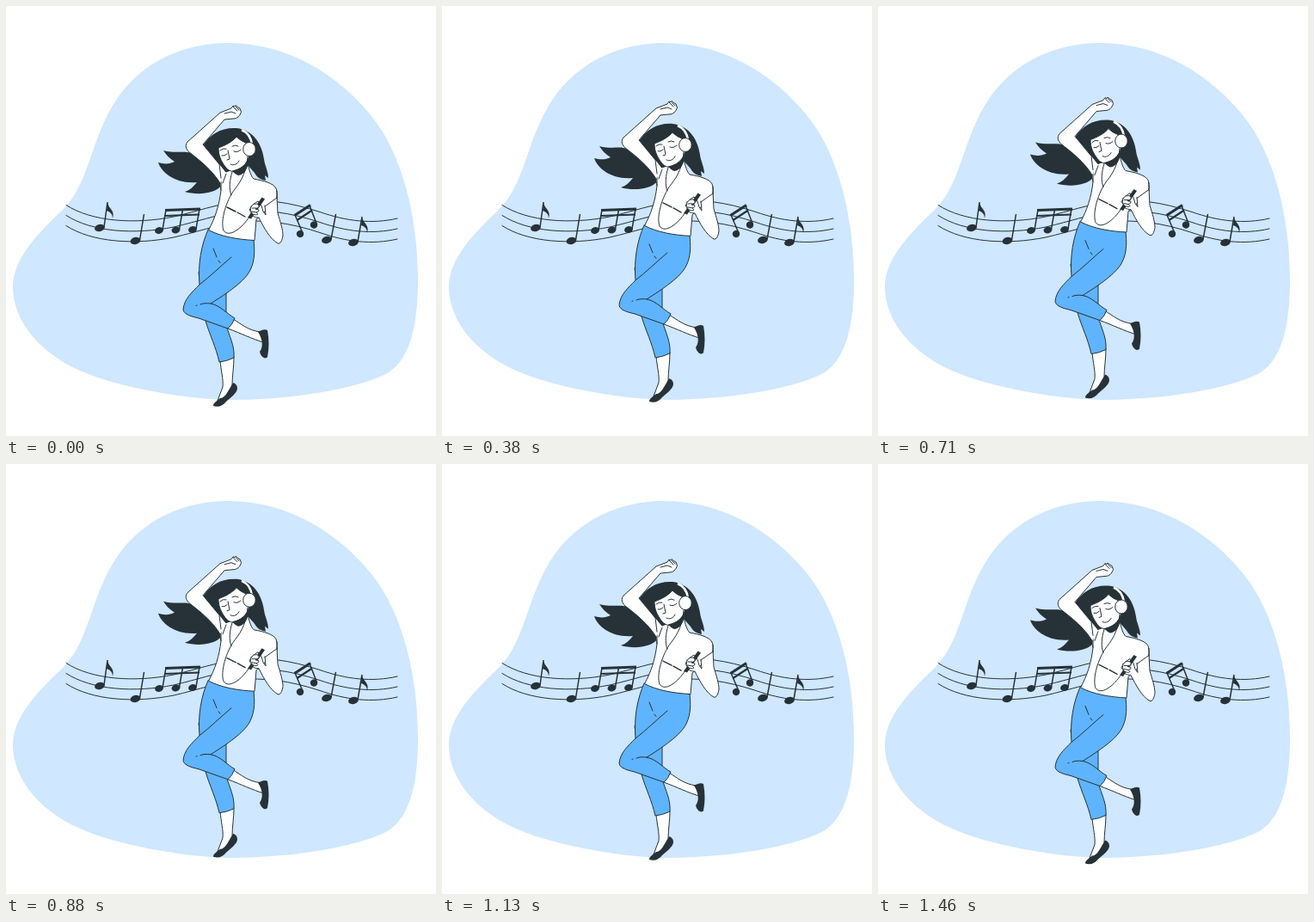
Animation of 500 by 500 pixels, one loop 1.5 s. Source, as an HTML page:

```html
<!DOCTYPE html>
<html lang="en">
<head>
<meta charset="utf-8">
<title>Dancing to music</title>
<style>
  html, body { margin: 0; width: 100%; height: 100%; overflow: hidden; background: #fff; }
  svg { display: block; width: 100vw; height: 100vh; }
  .ink { fill: #263238; }
  .line { fill: none; stroke: #263238; stroke-linecap: round; stroke-linejoin: round; }
  .skin { fill: #fff; stroke: #263238; stroke-linecap: round; stroke-linejoin: round; }
  .blue { fill: #5fb4ff; stroke: #263238; stroke-linecap: round; stroke-linejoin: round; }
</style>
</head>
<body>
<svg viewBox="0 0 500 500">
  <path fill="#cfe7ff" d="M258 43C330 43 388 82 425 128C462 174 479 248 479 318C479 366 472 408 445 426C412 445 330 458 262 458C200 457 128 441 96 428C40 407 8 366 8 327C8 292 40 262 66 237C98 205 98 154 129 108C159 64 208 43 258 43Z"/>
  <g id="staff" class="line"></g>
  <g id="notes"></g>

  <g id="dancer">
    <!-- hair -->
    <path class="ink" d="M268 142C250 141 238 149 229 162L221 172L211 170C204 169 194 171 183 168C186 173 190 177 196 181C190 184 184 184 177 182C181 194 197 207 222 205C218 210 214 214 208 216C222 220 243 219 251 208L262 196L281 185L289 194C292 200 297 202 302 203L301 197L305 200C305 192 301 186 300 178C298 162 288 144 268 142Z"/>

    <!-- standing leg -->
    <path class="skin" d="M249 412C250 425 253 434 252 443L246 459L256 456L263 441C263 430 265 420 265 408Z"/>
    <path class="ink" d="M264 438C267 439 269 441 269 445C268 451 261 455 256 460C252 465 247 467 241 465C241 461 246 459 249 456C255 456 258 448 264 438Z"/>
    <path class="blue" d="M224 310L232 366C237 383 244 396 248 414Q257 413 265 409C266 395 260 385 256 371L256 325Z"/>

    <!-- hips and raised leg -->
    <path class="skin" d="M264 364C274 370 281 377 296 379L299 391C286 387 274 381 258 375Z"/>
    <path class="ink" d="M293 379C296 377 301 375 304 377C306 388 306 398 304 408C302 411 298 409 296 405L295 402C299 397 299 388 293 379Z"/>
    <path class="blue" d="M235 260C227 278 223 300 225 324C216 333 207 341 206 353C207 359 216 361 224 363L258 375Q263 371 266 363C257 358 249 348 238 346C257 334 278 320 284 307C290 295 289 283 288 271Z"/>
    <path class="line" d="M225 324C238 314 250 302 262 292M238 346Q230 345 226 347M222 348L221 348.4M241 282L245 292M247 296L249 298.5"/>

    <!-- torso -->
    <path class="skin" d="M253 194L264 190L281 183C283 192 285 198 288 201C299 203 311 206 314 212C316 218 315 225 315 226L291 248L289 272.500C269 271.500 250 268 235.500 260.500C243 247 248 232 250 214C248 207 249 200 253 194Z"/>
    <path class="line" d="M250 214L250 200M256 195L252 206"/>

    <!-- raised arm -->
    <path class="skin" style="stroke:none" d="M249 124L211 158C208 162 209 166 213 170C226 180 240 191 249 206L256 194L248 184L229 161L254 132L264 131C269 130 272 127 273 123L268 116L264 116L262 119Z"/>
    <path class="line" d="M249 206C240 191 226 180 213 170C209 166 208 162 211 158L249 124L262 119L264 116L266 117L267 115.500L270 118L272 119L273.500 123C272 128 269 131 264 131L254 132L229 161L248 184L250 200M254 125L262 123L267 125M264 117L269 122M267 117L271 121"/>

    <!-- face -->
    <path class="skin" d="M247 165C255 162 263 158 268 152C272 156 276 158 279 159L283 172C282 181 276 188 266 192C262 193 258 191 255 187C250 180 247 174 247 165Z"/>
    <path class="ink" d="M263 191.500C270 190 276 187 281 181L281 186C279 193 274 197 270 197C267 196 265 194 263 191.500Z"/>
    <path class="line" d="M249 168Q252 165 256 166M263 163Q267 161 270 163M251 174Q254 175 257 172M265 169Q269 171 273 167M258 168L260 178L257 179M261 184C265 186 269 184 271 180"/>

    <!-- headphones -->
    <path d="M274 144C281 147 285 153 286 161" fill="none" stroke="#fff" stroke-width="2.600"/>
    <ellipse class="skin" cx="283" cy="166.500" rx="7.300" ry="8"/>

    <!-- cord -->
    <path class="line" d="M281 175C280 190 275 202 266 213C256 226 249 250 253 261C259 270 274 259 283 245M263 193C260 202 259 213 262 220"/>
    <path class="line" style="stroke-width:1.400" d="M257 234L267 239M269 240L278 245"/>

    <!-- lowered arm -->
    <path class="skin" d="M315 222L316 241C319 251 322 260 322 267C321 273 319 277 316 276C307 271 300 258 294 246C289 246 285 244 285 240L283 237L287 231L293 227L297 232L299 239L302 243L301 232"/>
    <path class="line" d="M315 215L315 223L301 233"/>
    <path class="ink" d="M297.500 222.500L301 224.500L285 247.500L281 246Z"/>
    <path class="skin" style="stroke-width:.9" d="M285 233Q288 229 292 230Q295 232 294 234L290 236L294 237Q295 239 291 240L293 242Q292 244 287 242Q283 238 285 233Z"/>
    <path class="line" d="M286 235L291 235M286 239L291 240"/>
  </g>
</svg>
<script>
const $ = id => document.getElementById(id);
const LOOP = 1500, LIFT = 10;

$('staff').innerHTML = [0, 12, 24].map(y =>
  `<path transform="translate(0 ${y})" d="M70 231.500C100 251 150 254 195 245C225 238 240 232 270 227C300 224 330 228 365 239.500C395 250 425 254 455 247"/>`
).join('');

const head = (x, y, rx = 6, ry = 4) =>
  `<ellipse class="ink" cx="${x}" cy="${y}" rx="${rx}" ry="${ry}" transform="rotate(-14 ${x} ${y})"/>`;
const bar = (x1, y1, x2, y2, w) =>
  `<path class="line" style="stroke-width:${w};stroke-linecap:butt" d="M${x1} ${y1}L${x2} ${y2}"/>`;
const note = (x, y, dx, dy, rx = 6, ry = 4) =>
  head(x, y, rx, ry) + bar(x + rx - 1, y - 1, x + dx, y + dy, 1.5);
const flag = (x, y) =>
  `<path class="ink" d="M${x} ${y}C${x + 1} ${y + 8} ${x + 9} ${y + 9} ${x + 6} ${y + 19}C${x + 6} ${y + 13} ${x + 2} ${y + 11} ${x - 1} ${y + 10}Z"/>`;

$('notes').innerHTML = [
  note(109, 258, 9, -30), flag(118, 228),
  note(150.5, 273, 10, -31),
  ...[178, 197.5, 217].map((x, i) => note(x, 261 - i * .5, 8, -24, 5, 3.8)),
  bar(185, 237.5, 226, 236, 3), bar(184, 244, 225, 242.5, 2.2),
  head(342, 265, 4.2, 4.2), bar(345, 264, 336, 243, 1.5),
  head(358, 254.5, 4.2, 4.2), bar(361.5, 254, 353, 232, 1.5),
  bar(335.5, 243.5, 354, 231.5, 3.2), bar(338.5, 249, 356, 237.5, 2.2),
  note(373, 272, 10.5, -30),
  note(404, 275, 10, -30), flag(414, 245)
].join('');

// The dancer rises and sinks at constant speed.
function draw(now) {
  const p = now % LOOP / LOOP;
  const y = -LIFT * (1 - Math.abs(2 * p - 1));
  $('dancer').setAttribute('transform', `translate(0 ${y.toFixed(3)})`);
}

let start;
function tick(now) {
  start ??= now;
  draw(now - start);
  requestAnimationFrame(tick);
}
draw(0);
requestAnimationFrame(tick);
</script>
</body>
</html>
```
